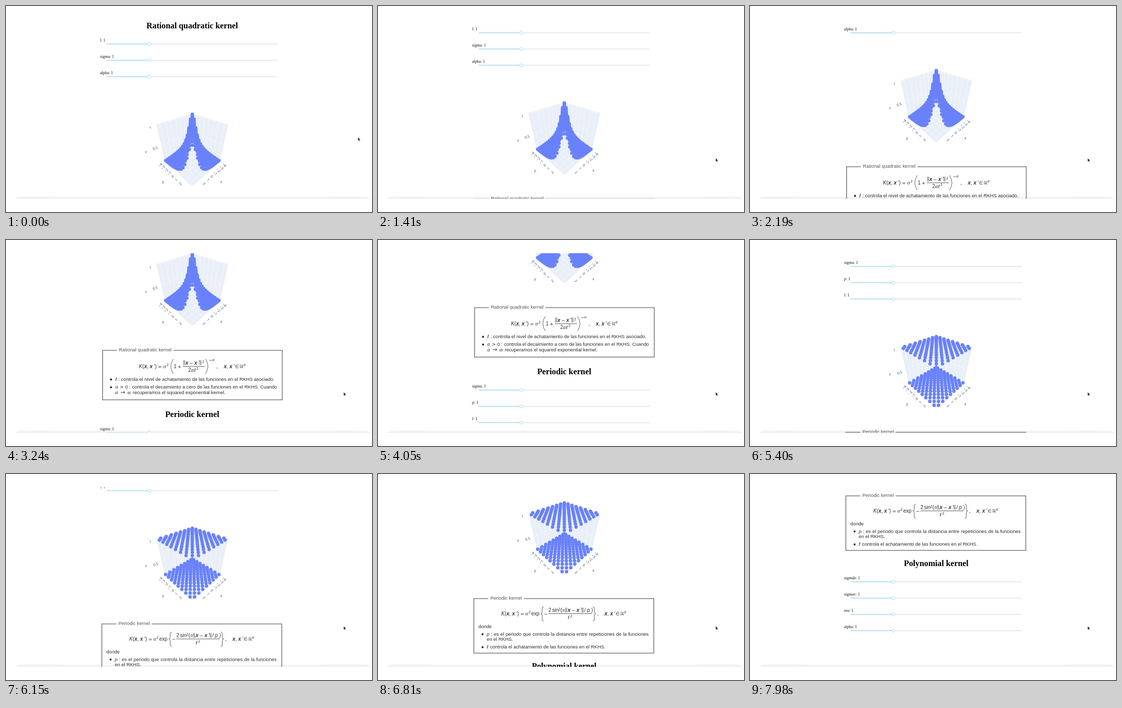
Write an HTML page that moves like this. It is 720x405 px and loops after 8 s.

```html
<!DOCTYPE html>
<html lang="es">
<head>
<meta charset="utf-8">
<title>Kernels</title>
<style>
  html, body { margin: 0; width: 100%; height: 100%; overflow: hidden; background: #fff; }
  #stage { position: absolute; left: 0; top: 0; display: block; }
  text { font-family: "Liberation Sans", Arial, sans-serif; font-size: 9.4px; fill: #2c2c2c; white-space: pre; }
  .head { font: bold 16.3px "Liberation Serif", Times, serif; fill: #000; text-anchor: middle; }
  .label { font: 8px "Liberation Serif", Times, serif; fill: #111; }
  .title { fill: #555; }
  .justified { word-spacing: .4px; }
  .math { font-size: 10px; }
  .it { font-style: italic; }
  .vec { font-weight: bold; font-style: italic; }
  .greek { font: italic 10.5px "Liberation Serif", Times, serif; }
  .sym { font: 9px "DejaVu Sans", sans-serif; }
  .sup { font-size: 6.8px; }
  .tick { font: 7px "Open Sans", sans-serif; fill: #2a3f5f; text-anchor: middle; }
  .frame { fill: none; stroke: #7b7b7b; stroke-width: 1.6; }
  .stroke { fill: none; stroke: #333; stroke-width: .8; }
  .bullet { fill: #222; }
  .wall { fill: #e9eff8; }
  .grid { fill: none; stroke: #fff; stroke-width: .9; stroke-opacity: .55; }
  .dot { fill: #6981fb; }
  #page { animation: scroll 8s infinite cubic-bezier(.25, .3, .3, 1); }
  #cursor { animation: point 8s infinite ease-in-out; }
  @keyframes scroll {
    0%, 15.9% { transform: translateY(0); }
    27.3%, 28.9% { transform: translateY(-86px); }
    40.5%, 41.1% { transform: translateY(-185px); }
    50.6%, 52.1% { transform: translateY(-269px); }
    59.9% { transform: translateY(-391px); }
    67.5%, 68% { transform: translateY(-512px); }
    76.3% { transform: translateY(-590px); }
    85.1%, 86.2% { transform: translateY(-645px); }
    99.7%, 100% { transform: translateY(-847px); }
  }
  @keyframes point {
    0%, 9.5% { transform: translate(692.3px, 258px); }
    13.9%, 100% { transform: translate(664.3px, 299px); }
  }
</style>
</head>
<body>
<svg id="stage" width="720" height="405" viewBox="0 0 720 405">
  <path d="M18 379 L24 374.6 Q60 373.4 120 374.8 H610 Q670 373.4 710 374.6 L717 379 Z" fill="#f4f4f4"/>
  <path d="M18 378.3 H716" stroke="#ececec"/>
  <svg y="26" width="720" height="353" viewBox="0 26 720 353">
    <g id="page">
      <text class="head" x="366.3" y="43.8">Rational quadratic kernel</text>
      <text class="head" x="366.3" y="532.6">Periodic kernel</text>
      <text class="head" x="366.3" y="1027.8">Polynomial kernel</text>

      <g transform="translate(0 185)">
        <path class="frame" d="M218 217 H190 V314.3 H543.5 V217 H329.5"/>
        <text class="title" x="222" y="219.3">Rational quadratic kernel</text>
        <text class="math it" x="261.5" y="251.5">K</text>
        <text class="math" x="268.3" y="251.5">(<tspan class="vec">x</tspan>, <tspan class="vec">x</tspan> ′)</text>
        <text class="sym" x="299" y="251.5">=</text>
        <text class="greek" x="309.5" y="251.5">σ</text>
        <text class="sup" x="316" y="247.5">2</text>
        <path class="stroke" d="M329 234 Q319.5 248.5 329 263 M392.5 234 Q402 248.5 392.5 263 M348 248.6 H391.5
          M349.3 236.5 v9.6 m2.3 0 v-9.6 M381.4 236.5 v9.6 m2.3 0 v-9.6"/>
        <text class="math" x="330" y="251.5">1</text>
        <text class="sym" x="337.5" y="251.5">+</text>
        <text class="math vec" x="353" y="244.5">x</text>
        <text class="sym" x="360.5" y="244.5">−</text>
        <text class="math" x="370.5" y="244.5"><tspan class="vec">x</tspan> ′</text>
        <text class="sup" x="386" y="241.5">2</text>
        <text class="math" x="358.5" y="258.5">2<tspan class="greek">α</tspan></text>
        <text class="sym" x="370" y="258.5">ℓ</text>
        <text class="sup" x="374.8" y="255">2</text>
        <text class="sym" x="399" y="238.5" style="font-size:8px">−</text>
        <text class="greek" x="405.7" y="238.3" style="font-size:8.5px">α</text>
        <text class="math" x="414" y="251.5">,</text>
        <text class="math" x="428.5" y="251.5"><tspan class="vec">x</tspan>, <tspan class="vec">x</tspan> ′</text>
        <text class="sym" x="450.5" y="251.5">∈</text>
        <text class="sym" x="459.5" y="251.5">ℝ</text>
        <text class="sup it" x="467" y="247.5">d</text>
        <path class="bullet" d="M205 272.5h3.4v3.4h-3.4z M205 287.8h3.4v3.4h-3.4z"/>
        <text class="sym" x="215" y="277.3">ℓ</text>
        <text x="221.3" y="277.3">:</text>
        <text x="226.3" y="277.3">controla el nivel de achatamiento de las funciones en el RKHS asociado.</text>
        <text class="greek" x="215" y="292.3">α</text>
        <text class="sym" x="224" y="292.3">&gt;</text>
        <text x="234.5" y="292.3">0 :</text>
        <text x="248" y="292.3">controla el decaimiento a cero de las funciones en el RKHS. Cuando</text>
        <text class="greek" x="215" y="303.3">α</text>
        <text class="sym" x="225" y="303.3" style="font-size:11px">→</text>
        <text class="sym" x="237.5" y="304" style="font-size:11px">∞</text>
        <text x="249.3" y="303.3">recuperamos el squared exponential kernel.</text>
      </g>

      <g transform="translate(0 847)">
        <path class="frame" d="M217 43 H188.5 V150.2 H542.5 V43 H286.5"/>
        <text class="title" x="221" y="45.3">Periodic kernel</text>
        <text class="math it" x="242.5" y="75.5">K</text>
        <text class="math" x="249.3" y="75.5">(<tspan class="vec">x</tspan>, <tspan class="vec">x</tspan> ′)</text>
        <text class="sym" x="280" y="75.5">=</text>
        <text class="greek" x="290" y="75.5">σ</text>
        <text class="sup" x="296.3" y="71.5">2</text>
        <text class="math" x="301.5" y="75.5">exp</text>
        <path class="stroke" d="M326 59 Q323 59 323 62 V69 Q323 72.5 320 72.5 Q323 72.5 323 76 V84 Q323 87 326 87
          M422.5 59 Q425.5 59 425.5 62 V69 Q425.5 72.5 428.5 72.5 Q425.5 72.5 425.5 76 V84 Q425.5 87 422.5 87 M335 72.5 H420.5
          M369 60.8 v9.6 m2.3 0 v-9.6 M401.4 60.8 v9.6 m2.3 0 v-9.6"/>
        <text class="sym" x="326" y="75.5">−</text>
        <text class="math" x="335.3" y="68.8">2</text>
        <text class="math" x="342.5" y="68.8">sin</text>
        <text class="sup" x="355" y="65.5">2</text>
        <text class="math" x="359" y="68.8">(<tspan class="greek">π</tspan></text>
        <text class="math vec" x="373" y="68.8">x</text>
        <text class="sym" x="380.5" y="68.8">−</text>
        <text class="math" x="390.5" y="68.8"><tspan class="vec">x</tspan> ′</text>
        <text class="math" x="405.7" y="68.8">/<tspan class="it"> p</tspan> )</text>
        <text class="sym" x="373.5" y="82.5">ℓ</text>
        <text class="sup" x="378.3" y="79.5">2</text>
        <text class="math" x="431" y="75.5">,</text>
        <text class="math" x="445.5" y="75.5"><tspan class="vec">x</tspan>, <tspan class="vec">x</tspan> ′</text>
        <text class="sym" x="467.5" y="75.5">∈</text>
        <text class="sym" x="476.5" y="75.5">ℝ</text>
        <text class="sup it" x="484" y="71.5">d</text>
        <text x="197.5" y="101.3">donde</text>
        <path class="bullet" d="M204 111.3h3.4v3.4h-3.4z M204 136.8h3.4v3.4h-3.4z"/>
        <text class="it" x="214" y="115.6">p</text>
        <text x="222" y="115.6">:</text>
        <text class="justified" x="227.8" y="115.6">es el periodo que controla la distancia entre repeticiones de la funciones</text>
        <text x="214" y="125.8">en el RKHS.</text>
        <text class="sym" x="214" y="141">ℓ</text>
        <text x="220.6" y="141">controla el achatamiento de las funciones en el RKHS.</text>
      </g>
    </g>
  </svg>
  <path id="cursor" d="M0 0 V7.2 L1.7 5.7 L2.8 8.2 L4 7.7 L2.9 5.2 H5 Z" fill="#111" stroke="#fff" stroke-width=".5"/>
</svg>
<script>
const page = document.getElementById('page');

function add(parent, tag, attrs, text) {
  const node = document.createElementNS('http://www.w3.org/2000/svg', tag);
  for (const key in attrs) node.setAttribute(key, attrs[key]);
  if (text !== undefined) node.textContent = text;
  parent.append(node);
  return node;
}

function sliders(top, names) {
  names.forEach((name, i) => {
    const y = top + 32 * i;
    add(page, 'text', { class: 'label', x: 185, y: y - 5 }, name + ': 1');
    add(page, 'rect', { x: 198, y: y - 1, width: 337, height: 2, rx: 1, fill: '#e9e9e9' });
    add(page, 'rect', { x: 198, y: y - 1, width: 84, height: 2, rx: 1, fill: '#b9e2f6' });
    add(page, 'circle', { cx: 282, cy: y, r: 3.1, fill: '#fff', stroke: '#a9dcf5', 'stroke-width': 1 });
  });
}

// Perspective view of a unit cube from (1.25, 1.25, 1.25)
const CX = 106.5, CY = 70, SCALE = 188;
function project(x, y, z) {
  const depth = 1.25 * Math.sqrt(3) - (x + y + z) / Math.sqrt(3);
  return {
    x: CX + SCALE * (y - x) / Math.SQRT2 / depth,
    y: CY - SCALE * (2 * z - x - y) / Math.sqrt(6) / depth,
    depth
  };
}

function plot(centerY, kernel) {
  const svg = add(page, 'svg', { x: 260, y: centerY - CY, width: 220, height: CY + 79.5 });
  const path = points => 'M' + points.map(p => { const q = project(...p); return q.x + ' ' + q.y; }).join('L');
  const line = (a, b) => add(svg, 'path', { class: 'grid', d: path([a, b]) });
  const label = (x, y, text, angle = 0) =>
    add(svg, 'text', { class: 'tick', transform: `translate(${x} ${y}) rotate(${angle})`, y: 2.5 }, text);

  const steps = Array.from({ length: 16 }, (_, i) => -4 + i / 2);
  const fill = 0.965, h = 0.5;
  const place = v => (v + 0.25) / 7.5 * fill;
  const values = steps.flatMap(x => steps.map(y => kernel(x - y)));
  const low = Math.min(...values);
  const lift = k => ((k - low) / (1 - low) - 0.5) * fill;

  for (const wall of [
    [[-h, -h, -h], [-h, h, -h], [-h, h, h], [-h, -h, h]],
    [[-h, -h, -h], [h, -h, -h], [h, -h, h], [-h, -h, h]],
    [[-h, -h, -h], [h, -h, -h], [h, h, -h], [-h, h, -h]]
  ]) add(svg, 'path', { class: 'wall', d: path(wall) + 'Z' });

  for (let v = -4; v <= 3; v++) {
    const t = place(v);
    line([-h, t, -h], [-h, t, h]);
    line([t, -h, -h], [t, -h, h]);
    line([t, -h, -h], [t, h, -h]);
    line([-h, t, -h], [h, t, -h]);
    const edge = project(h, t, -h);
    const name = String(v).replace('-', '−');
    label(edge.x - 9.5, edge.y + 7, name, -42);
    label(2 * CX - edge.x + 9.5, edge.y + 7, name, 42);
  }
  for (const v of [0.5, 1]) {
    const z = lift(v), edge = project(h, -h, z);
    line([-h, -h, z], [-h, h, z]);
    line([-h, -h, z], [h, -h, z]);
    label(edge.x - 12, edge.y + 5, v, -18);
  }
  label(15.5, 82.5, 'z');
  label(49, 141.5, 'y');
  label(163.5, 141.5, 'x');

  steps.flatMap(x => steps.map(y => project(place(x), place(y), lift(kernel(x - y)))))
    .sort((a, b) => b.depth - a.depth)
    .forEach(p => add(svg, 'circle', { class: 'dot', cx: p.x, cy: p.y, r: 3.35 }));
}

sliders(74.7, ['l', 'sigma', 'alpha']);
plot(273.5, d => 1 / (1 + d * d / 2));
sliders(564, ['sigma', 'p', 'l']);
plot(762.5, d => Math.exp(-2 * Math.sin(Math.PI * d) ** 2));
sliders(1059, ['sigmab', 'sigmav', 'mu', 'alpha']);
</script>
</body>
</html>
```
